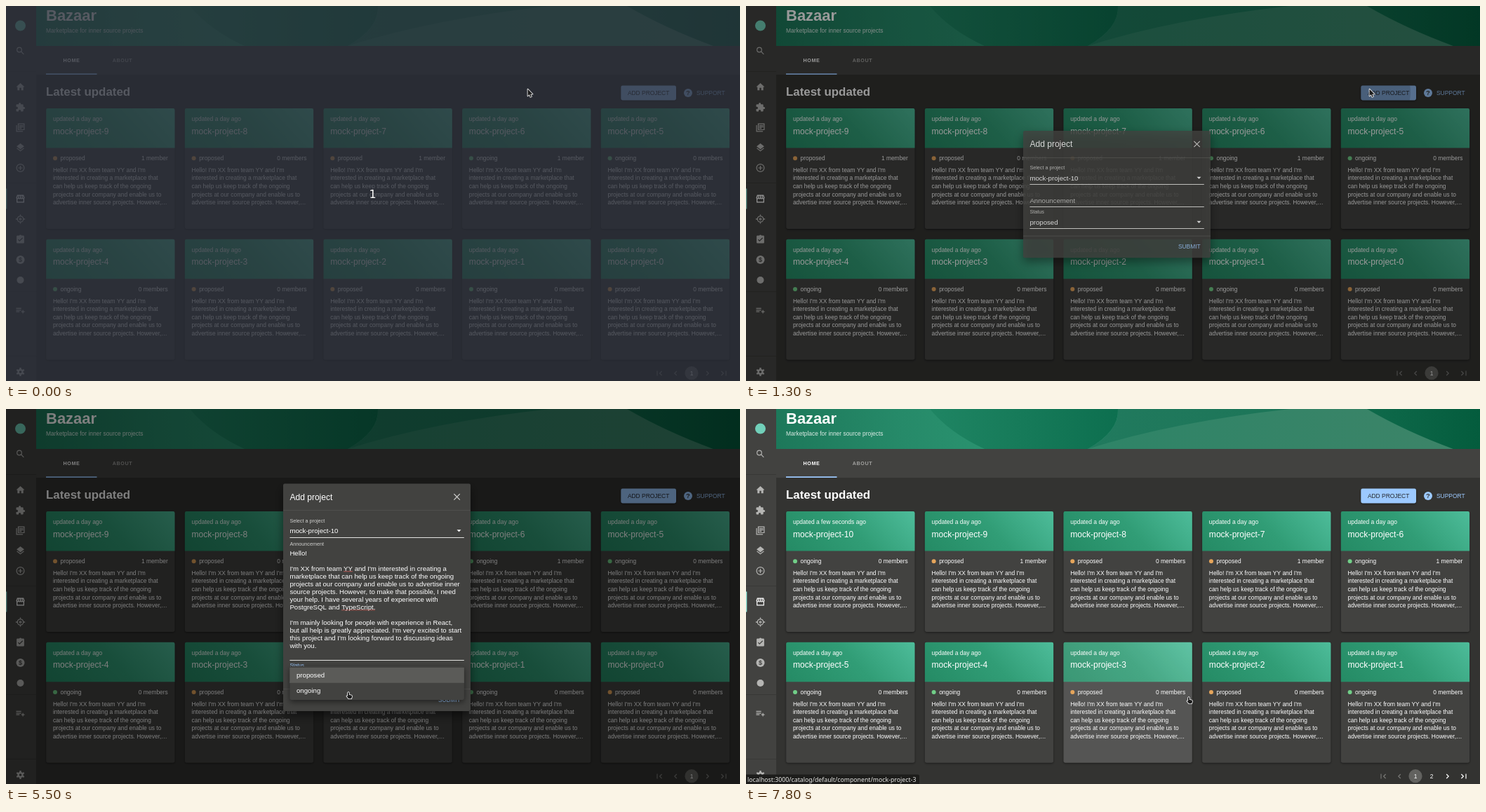
Animation of 1046x535 px, one loop 8000 ms. Source, as an HTML page with a canvas:

```html
<!DOCTYPE html>
<html lang="en">
<head>
<meta charset="utf-8">
<title>Bazaar</title>
<style>
  html, body { margin: 0; width: 100%; height: 100%; overflow: hidden; background: #333331; }
  canvas { display: block; }
</style>
</head>
<body>
<canvas id="stage" width="1046" height="535"></canvas>
<script>
const ctx = document.getElementById('stage').getContext('2d');
const LOOP = 8000, STEP = 100;
const SANS = '"Liberation Sans", Arial, sans-serif';
const PAPER = '#424240', BLUE = '#9cc9ff', GREY = '#b5b5b3', LABEL = '#d0d0ce', RULE = '#e2e2e0';
const BODY = 8.43, INPUT = 9.63, SMALL = 7.23;

const clamp = x => Math.max(0, Math.min(1, x));
const easeOut = x => 1 - (1 - clamp(x)) ** 2.2;
const smooth = x => x * x * (3 - 2 * x);
const mix = (a, b, k) => a + (b - a) * k;

function text(s, x, y, size, color = '#fff', { weight = 400, align = 'left', spacing = 0, family = SANS } = {}) {
  ctx.font = `${weight} ${size}px ${family}`;
  ctx.textAlign = align;
  ctx.letterSpacing = spacing + 'px';
  ctx.fillStyle = color;
  ctx.fillText(s, x, y);
}

function rect(x, y, w, h, color, radius = 0) {
  ctx.fillStyle = color;
  ctx.beginPath();
  ctx.roundRect(x, y, w, h, radius);
  ctx.fill();
}

function disc(x, y, r, color) {
  ctx.fillStyle = color;
  ctx.beginPath();
  ctx.arc(x, y, r, 0, 7);
  ctx.fill();
}

function shadowed(blur, offset, draw) {
  ctx.save();
  ctx.shadowColor = 'rgba(0,0,0,.5)';
  ctx.shadowBlur = blur;
  ctx.shadowOffsetY = offset;
  draw();
  ctx.restore();
}

function gradient(x0, y0, x1, y1, ...colors) {
  const g = ctx.createLinearGradient(x0, y0, x1, y1);
  colors.forEach((c, i) => g.addColorStop(i / (colors.length - 1), c));
  return g;
}

// Icons live on a 24-unit grid; a width of 0 means filled.
function icon(d, x, y, color, width = 0) {
  const path = new Path2D(d);
  ctx.save();
  ctx.translate(x - 7.2, y - 7.2);
  ctx.scale(0.6, 0.6);
  ctx.fillStyle = ctx.strokeStyle = color;
  ctx.lineWidth = width;
  if (width) ctx.stroke(path); else ctx.fill(path, 'evenodd');
  ctx.restore();
}

const ring = r => `M${12 - r} 12a${r} ${r} 0 1 0 ${2 * r} 0a${r} ${r} 0 1 0 ${-2 * r} 0`;

const MENU_ICONS = [
  [64, 'M4 9.5a5.5 5.5 0 1 0 11 0a5.5 5.5 0 1 0-11 0M14 14l6 6', 2],
  [115.5, 'M10 20v-6h4v6h5v-8h3L12 3 2 12h3v8z', 0],
  [144.5, 'M20.5 11H19V7a2 2 0 0 0-2-2h-4V3.5a2.5 2.5 0 0 0-5 0V5H4a2 2 0 0 0-2 2v3.8h1.5a2.7 2.7 0 0 1 0 5.4H2V20a2 2 0 0 0 2 2h3.8v-1.5a2.7 2.7 0 0 1 5.4 0V22H17a2 2 0 0 0 2-2v-4h1.5a2.5 2.5 0 0 0 0-5z', 0],
  [173.5, 'M3 6v15h15M7 3h14v14H7zM9 7h10M9 10h10M9 13.5h6', 2],
  [202, 'M12 18.5l-7.4-5.7L3 14l9 7 9-7-1.6-1.2zM12 16l9-7-9-7-9 7z', 0],
  [231, ring(9) + 'M12 7v10M7 12h10', 2],
  [275, 'M4 12v8h16v-8M5 4h14l2 6q-2 4-4.5 0-2 4-4.5 0-2 4-4.5 0-2.5 4-4.5 0zM12 4v6M8 4l-.5 6M16 4l.5 6', 2],
  [304, ring(7) + ring(2) + 'M12 1v4M12 19v4M1 12h4M19 12h4', 2.2],
  [333, 'M19 3h-4.2a3 3 0 0 0-5.6 0H5a2 2 0 0 0-2 2v14a2 2 0 0 0 2 2h14a2 2 0 0 0 2-2V5a2 2 0 0 0-2-2zM10 17l-4-4 1.4-1.4 2.6 2.6 6.6-6.6L18 9z', 0],
  [362, ring(10), 0],
  [435, 'M2 6h12M2 10h12M2 14h8M18 10v8M14 14h8', 2],
  [522, ring(5) + 'M12 2v4M12 18v4M3.3 7l3.5 2M17.2 15l3.5 2M3.3 17l3.5-2M17.2 9l3.5-2', 4],
];

function sidebar() {
  rect(0, 0, 43, 535, PAPER);
  for (const y of [93, 252, 407, 499]) rect(0, y, 43, 1, '#383836');
  disc(20.5, 28, 7.5, '#71cfb9');
  for (const [y, d, width] of MENU_ICONS) icon(d, 20.5, y, y === 275 ? '#fff' : GREY, width);
  disc(20.5, 391, 5, GREY);
  text('$', 20.5, 365.3, 9, PAPER, { weight: 700, align: 'center' });
  rect(0, 260.5, 1.3, 29, '#9bf0e1');
}

function shape(d, color) {
  ctx.fillStyle = color;
  ctx.fill(new Path2D(d));
}

function header() {
  rect(43, 0, 1003, 57, gradient(43, 40, 400, 0, '#1d785a', '#268a69', '#2c9672'));
  shape('M262 0Q290 34 340 57H487Q532 32 530 0z', gradient(262, 0, 530, 0, '#1f8563', '#0d6f4f'));
  shape('M530 0Q532 32 487 57H1046V0z', gradient(487, 0, 900, 0, '#217a5e', '#1a7355'));
  shape('M487 57Q610 18 775 0H885L1008 57z', gradient(487, 0, 1008, 0, '#2e8467', '#3c8468'));
  shape('M885 0Q940 32 1008 57H1046V0z', gradient(885, 0, 1046, 0, '#0f6a4b', '#045c3d'));
  text('Bazaar', 57, 21.3, 22, '#fff', { weight: 700 });
  text('Marketplace for inner source projects', 57, 37.5, BODY, '#dcebe5');

  rect(43, 57, 1003, 41, PAPER);
  const tab = { weight: 700, align: 'center', spacing: 0.6 };
  text('HOME', 93.5, 79.8, 7.2, '#fff', tab);
  text('ABOUT', 166, 79.8, 7.2, '#a0a09e', tab);
  rect(57, 96.3, 72.5, 1.6, BLUE);
}

const ONGOING = [1, 4, 5, 6, 10], STAFFED = [6, 7, 9];
const SUMMARY = [
  "Hello! I'm XX from team YY and I'm",
  'interested in creating a marketplace that',
  'can help us keep track of the ongoing',
  'projects at our company and enable us to',
  'advertise inner source projects. However,…',
];

function card(slot, id, hover) {
  const x = 57.2 + (slot % 5) * 197.65, y = 146 + Math.floor(slot / 5) * 186.7;
  const w = 183.3, h = 172, left = x + 9.7;
  const ongoing = ONGOING.includes(id);
  shadowed(3, 1, () => rect(x, y, w, h, PAPER, 2.4));
  rect(x, y, w, 56.5, gradient(x + 30, y + 85, x + 160, y - 35, '#258b65', '#319d76', '#50bf9d'), [2.4, 2.4, 0, 0]);
  if (hover) rect(x, y, w, h, `rgba(255,255,255,${0.1 * hover})`, 2.4);
  text(id === 10 ? 'updated a few seconds ago' : 'updated a day ago', left, y + 18, 8.5);
  text('mock-project-' + id, left, y + 36.5, 12.05);
  disc(x + 12.8, y + 71.2, 3, ongoing ? '#71cf88' : '#e5a55b');
  text(ongoing ? 'ongoing' : 'proposed', x + 20.3, y + 74.2, BODY);
  text(STAFFED.includes(id) ? '1 member' : '0 members', x + w - 9.7, y + 74.2, BODY, '#fff', { align: 'right' });
  SUMMARY.forEach((line, i) => text(line, left, y + 90.8 + i * 11.6, BODY));
}

function pagination(added) {
  const start = added ? 908 : 931, dim = '#777775', next = added ? '#fff' : dim;
  icon('M7 6v12M18 7l-5 5 5 5', start, 524, dim, 2);
  icon('M15 7l-5 5 5 5', start + 23, 524, dim, 2);
  disc(start + 46, 523.7, 9.6, '#62625f');
  text('1', start + 46, 526.8, BODY, '#fff', { align: 'center' });
  if (added) text('2', 977, 526.8, BODY, '#fff', { align: 'center' });
  icon('M9 7l5 5-5 5', 1000, 524, next, 2);
  icon('M17 6v12M6 7l5 5-5 5', 1023, 524, next, 2);
}

function page(t) {
  const added = t >= 7000;
  rect(0, 0, 1046, 535, '#333331');
  header();
  sidebar();
  text('Latest updated', 57, 128, 16.9, '#fff', { weight: 700 });

  shadowed(3, 1, () => rect(876.3, 113.5, 78.7, 21, t >= 900 && t < 1500 ? '#8fb9ee' : BLUE, 2.4));
  if (t >= 1200 && t < 1500) {
    ctx.save();
    ctx.beginPath();
    ctx.rect(876.3, 113.5, 78.7, 21);
    ctx.clip();
    disc(889, 123, (t - 1100) * 0.29, 'rgba(0,0,0,.15)');
    ctx.restore();
  }
  text('ADD PROJECT', 915.6, 126.9, BODY, '#262a30', { align: 'center' });
  disc(972, 124, 6, BLUE);
  text('?', 972, 127.3, 9.5, '#333331', { weight: 700, align: 'center' });
  text('SUPPORT', 984, 126.9, BODY, BLUE);

  const hover = clamp((t - 7450) / 250);
  for (let i = 0; i < 10; i++) card(i, (added ? 10 : 9) - i, added && i === 7 ? hover : 0);
  pagination(added);
}

const ANNOUNCEMENT = `Hello!

I'm XX from team YY and I'm interested in creating a
marketplace that can help us keep track of the ongoing
projects at our company and enable us to advertise inner
source projects. However, to make that possible, I need
your help. I have several years of experience with
PostgreSQL and TypeScript.

I'm mainly looking for people with experience in React,
but all help is greatly appreciated. I'm very excited to start
this project and I'm looking forward to discussing ideas
with you.
`.split('\n');

function field(label, value, y, focused) {
  if (focused) rect(404.4, y - 9, 248.4, 18.5, 'rgba(255,255,255,.05)');
  text(label, 404.4, y - 12, SMALL, focused ? BLUE : LABEL);
  text(value, 404.4, y + 3.4, INPUT);
  rect(404.4, Math.round(y + 9), 248.4, focused ? 1.4 : 1, focused ? BLUE : RULE);
  icon('M7 10l5 5 5-5z', 645.5, y - 0.3, '#fff');
}

function announcement(t, y, filled) {
  const focused = t >= 2500 && t < 4800;
  const shrink = t >= 7000 ? 1 : easeOut((t - 2400) / 250);
  text('Announcement', 404.4, mix(y + 3.3, y - 10.3, shrink), mix(INPUT, SMALL, shrink),
    focused ? BLUE : shrink ? LABEL : '#c6c6c4');
  if (filled) ANNOUNCEMENT.forEach((line, i) => text(line, 404.4, y + 3.5 + i * 11, INPUT));
  else if (shrink > 0.9) text('Describe who you are and what skills you are looking for', 404.4, y + 3.5, INPUT, '#a2a2a0');
  if (filled && t >= 4200) {
    rect(481, y + 25.8, 13, 0.8, '#d0605a');
    rect(478, y + 80.9, 48, 0.8, '#d0605a');
  }
  const bottom = Math.round(y + 9 + (filled ? 143 : 0));
  rect(404.4, bottom, 248.4, 1, RULE);
  if (focused) {
    const half = 124.2 * easeOut((t - 2400) / 250);
    rect(528.6 - half, bottom - 0.4, half * 2, 1.4, BLUE);
    if (filled ? t < 3800 : t < 2900) rect(404.4, filled ? y + 138 : y - 5, 0.8, 11, '#fff');
  }
}

function selectMenu(t) {
  const alpha = t < 5600 ? easeOut((t - 4750) / 300) : 1 - easeOut((t - 5600) / 200);
  if (alpha <= 0) return;
  ctx.save();
  ctx.globalAlpha = alpha;
  shadowed(8, 3, () => rect(404.4, 367, 248.4, 48, PAPER, 2.4));
  rect(404.4, 369, 248.4, 21.7, '#5b5b58');
  if (t >= 5600) rect(404.4, 390.7, 248.4, 21.7, '#4f4f4c');
  text('proposed', 414, 383.3, INPUT);
  text('ongoing', 414, 404.9, INPUT);
  ctx.restore();
}

function dialog(t) {
  const shown = t < 7300 ? easeOut((t - 1190) / 215) : 1 - easeOut((t - 7300) / 195);
  if (shown <= 0) return;
  const filled = t >= 3100 && t < 7000;
  const shift = filled ? 71.6 : 0, top = 178 - shift, low = 178 + shift;
  ctx.save();
  ctx.globalAlpha = shown;
  rect(0, 0, 1046, 535, 'rgba(0,0,0,.5)');
  shadowed(14, 6, () => rect(395, top, 267, low + 181.3 - top, PAPER, 2.4));
  text('Add project', 404.4, top + 23.2, 12.05);
  icon('M5 5l14 14M19 5L5 19', 642.6, top + 19, '#d5d5d3', 2);
  rect(395, top + 38, 267, 0.7, '#5a5a58');
  field('Select a project', 'mock-project-' + (t >= 7000 ? 11 : 10), top + 67.3, false);
  announcement(t, top + 99.2, filled);
  field('Status', t >= 5700 && t < 7000 ? 'ongoing' : 'proposed', low + 130.2, t >= 4800 && t < 6700);
  rect(395, low + 149.8, 267, 0.7, '#5a5a58');
  if (t >= 6500) rect(606, low + 154.5, 52, 21, 'rgba(156,201,255,.12)', 2.4);
  if (t >= 6700 && t < 7000) rect(606, low + 154.5, 52, 21, 'rgba(156,201,255,.2)', 2.4);
  text('SUBMIT', 631.8, low + 168, BODY, BLUE, { align: 'center' });
  ctx.restore();
  selectMenu(t);
}

const POINTER_PATH = [
  [0, 743, 118], [200, 743, 118], [300, 748, 119], [400, 751, 119], [500, 751, 119],
  [1000, 888, 118], [1400, 888, 118], [2200, 503, 283], [4100, 503, 283], [4600, 488, 379],
  [5000, 488, 379], [5200, 488, 396], [5400, 488, 396], [5500, 488, 404], [6100, 488, 404],
  [6500, 631, 411], [LOOP, 631, 411],
];
const POINTERS = {
  arrow: 'M.5.5v10l2.3-2.2 1.6 3.6 1.5-.7-1.5-3.4h3.2z',
  hand: 'M-.9 .8q.9-1.5 1.8 0v3l3.3.8q1 .4.8 1.6l-.8 3h-4l-2.8-3.4q.2-1 1.7-.2z',
  beam: 'M-2-4.5h1.5l.5.5.5-.5H2M0-4v8M-2 4.5h1.5L0 4l.5.5H2',
};

function pointerKind(t) {
  const within = (a, b) => t >= a && t < b;
  if (within(2100, 4500)) return 'beam';
  if (within(900, 1200) || within(4500, 5800) || within(6500, 7000) || t >= 7500) return 'hand';
  return 'arrow';
}

function pointer(t) {
  const i = POINTER_PATH.findIndex(p => p[0] > t);
  const [t0, x0, y0] = POINTER_PATH[i - 1], [t1, x1, y1] = POINTER_PATH[i];
  const k = smooth((t - t0) / (t1 - t0)), kind = pointerKind(t);
  const path = new Path2D(POINTERS[kind]);
  ctx.save();
  ctx.translate(mix(x0, x1, k), mix(y0, y1, k));
  ctx.lineJoin = 'round';
  ctx.strokeStyle = '#fff';
  ctx.lineWidth = kind === 'beam' ? 2 : 1.6;
  ctx.stroke(path);
  ctx.fillStyle = ctx.strokeStyle = '#1c1c1c';
  ctx.lineWidth = 0.8;
  if (kind === 'beam') ctx.stroke(path); else ctx.fill(path);
  ctx.restore();
}

function linkBar(t) {
  ctx.save();
  ctx.globalAlpha = clamp((t - 7500) / 200);
  rect(0, 521.5, 247, 14, '#1d1d1b', [0, 2, 0, 0]);
  text('localhost:3000/catalog/default/component/mock-project-3', 2, 531.7, 8.75, '#e8e8e6',
    { family: '"Noto Sans", sans-serif' });
  ctx.restore();
}

function countdown() {
  rect(0, 0, 1046, 535, 'rgba(39,43,53,.78)');
  shadowed(2, 0, () => text('1', 522.5, 274, 16, '#fff', { align: 'center', family: '"DejaVu Sans", sans-serif' }));
}

function draw(now) {
  const t = Math.floor((now % LOOP) / STEP) * STEP;
  page(t);
  dialog(t);
  if (t >= 7600) linkBar(t);
  if (t < 300) countdown();
  pointer(t);
  requestAnimationFrame(draw);
}
requestAnimationFrame(draw);
</script>
</body>
</html>
```
